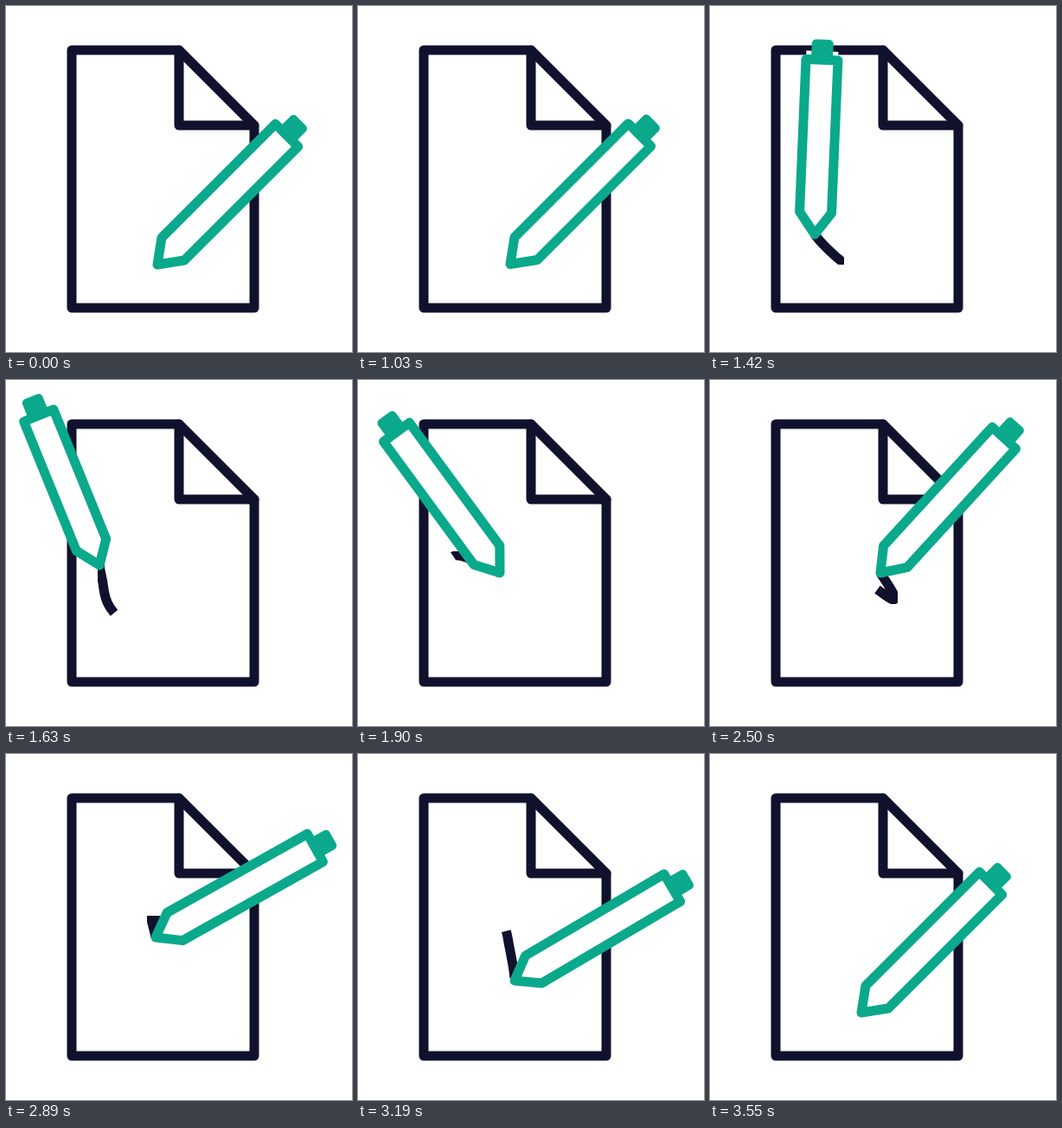
An HTML page with a canvas for the animation above (3580 ms loop, 400 by 400 pixels).

```html
<!DOCTYPE html>
<html>
<head>
<meta charset="utf-8">
<title>Signing a document</title>
<style>
  html, body { margin: 0; width: 100%; height: 100%; overflow: hidden; background: #fff; }
  canvas { display: block; }
</style>
</head>
<body>
<canvas id="stage" width="400" height="400"></canvas>
<script>
const ctx = document.getElementById('stage').getContext('2d');
const NAVY = '#10112d', TEAL = '#0aa98b';
const LOOP = 3580, START = 1030, STEP = 30, INK_LENGTH = 58;

// Key points of the signature
const keys = [
  { t: 1030, x: 176, y: 298.5, tilt: 45 },
  { t: 1280, x: 156, y: 298, tilt: 22 },
  { t: 1420, x: 121, y: 264, tilt: 2.4 },
  { t: 1540, x: 112, y: 235, tilt: -16 },
  { t: 1710, x: 112, y: 203, tilt: -26 },
  { t: 1900, x: 164, y: 223, tilt: -36.3 },
  { t: 2160, x: 212, y: 254, tilt: -3 },
  { t: 2500, x: 197, y: 223, tilt: 42.5 },
  { t: 2740, x: 168, y: 185, tilt: 56 },
  { t: 2890, x: 173, y: 212, tilt: 60.7 },
  { t: 3190, x: 181, y: 262, tilt: 59.5 },
  { t: 3550, x: 175, y: 299, tilt: 45 },
];
const rest = keys[keys.length - 1];

function slope(i, name) {
  const a = keys[i - 1], b = keys[i + 1];
  return a && b ? (b[name] - a[name]) / (b.t - a.t) : 0;
}

// Smooth pose through the key points (cubic Hermite)
function pose(t) {
  if (t < START || t >= rest.t) return rest;
  const i = keys.findIndex(k => k.t > t) - 1;
  const a = keys[i], b = keys[i + 1];
  const span = b.t - a.t, u = (t - a.t) / span, v = 1 - u;
  const mix = name =>
    v * v * (1 + 2 * u) * a[name] + u * u * (3 - 2 * u) * b[name] +
    span * u * v * (v * slope(i, name) - u * slope(i + 1, name));
  return { x: mix('x'), y: mix('y'), tilt: mix('tilt') };
}

// The barrel looks shorter while the pen leans left
const barrelLength = t => 186 - 25 * Math.exp(-(((t - 1660) / 245) ** 2));

function outline(points, close) {
  ctx.beginPath();
  points.forEach(([x, y]) => ctx.lineTo(x, y));
  if (close) ctx.closePath();
}

function drawPaper() {
  ctx.strokeStyle = NAVY;
  outline([[200, 51], [76, 51], [76, 349], [287, 349], [287, 138]], true);
  ctx.stroke();
  outline([[200, 51], [200, 138], [287, 138]]);
  ctx.stroke();
}

const inkArea = new Path2D('M106 198H163V187H217V259H155V299H106Z');

// The newest stretch of the signature, of constant length
function drawInk(t) {
  let last = pose(t), length = 0;
  const points = [[last.x, last.y]];
  for (let s = t - 5; s >= START && length < INK_LENGTH; s -= 5) {
    const p = pose(s);
    length += Math.hypot(p.x - last.x, p.y - last.y);
    points.push([p.x, p.y]);
    last = p;
  }
  ctx.save();
  ctx.clip(inkArea);
  ctx.lineCap = 'butt';
  outline(points);
  ctx.stroke();
  ctx.restore();
}

function drawPen({ x, y, tilt }, barrel) {
  const half = 18.5, shoulder = -25.5, top = shoulder - barrel;
  ctx.save();
  ctx.translate(x, y);
  ctx.rotate(tilt * Math.PI / 180);
  ctx.fillStyle = '#fff';
  ctx.fillRect(-half, top - 10, 2 * half, 10);
  outline([[0, 0], [-half, shoulder], [-half, top], [half, top], [half, shoulder]], true);
  ctx.fill();
  ctx.strokeStyle = ctx.fillStyle = TEAL;
  ctx.stroke();
  ctx.beginPath();
  ctx.roundRect(-12.5, top - 23.5, 25, 27, 5);
  ctx.fill();
  ctx.restore();
}

function frame(now) {
  const time = now % LOOP;
  const t = time < START ? 0 : START + Math.floor((time - START) / STEP) * STEP;
  ctx.fillStyle = '#fff';
  ctx.fillRect(0, 0, 400, 400);
  ctx.lineWidth = 11;
  ctx.lineJoin = ctx.lineCap = 'round';
  drawPaper();
  if (t > START && t < rest.t) drawInk(t);
  drawPen(pose(t), barrelLength(t));
}

const begin = performance.now();
function tick() {
  frame(performance.now() - begin);
  requestAnimationFrame(tick);
}
tick();
</script>
</body>
</html>
```
